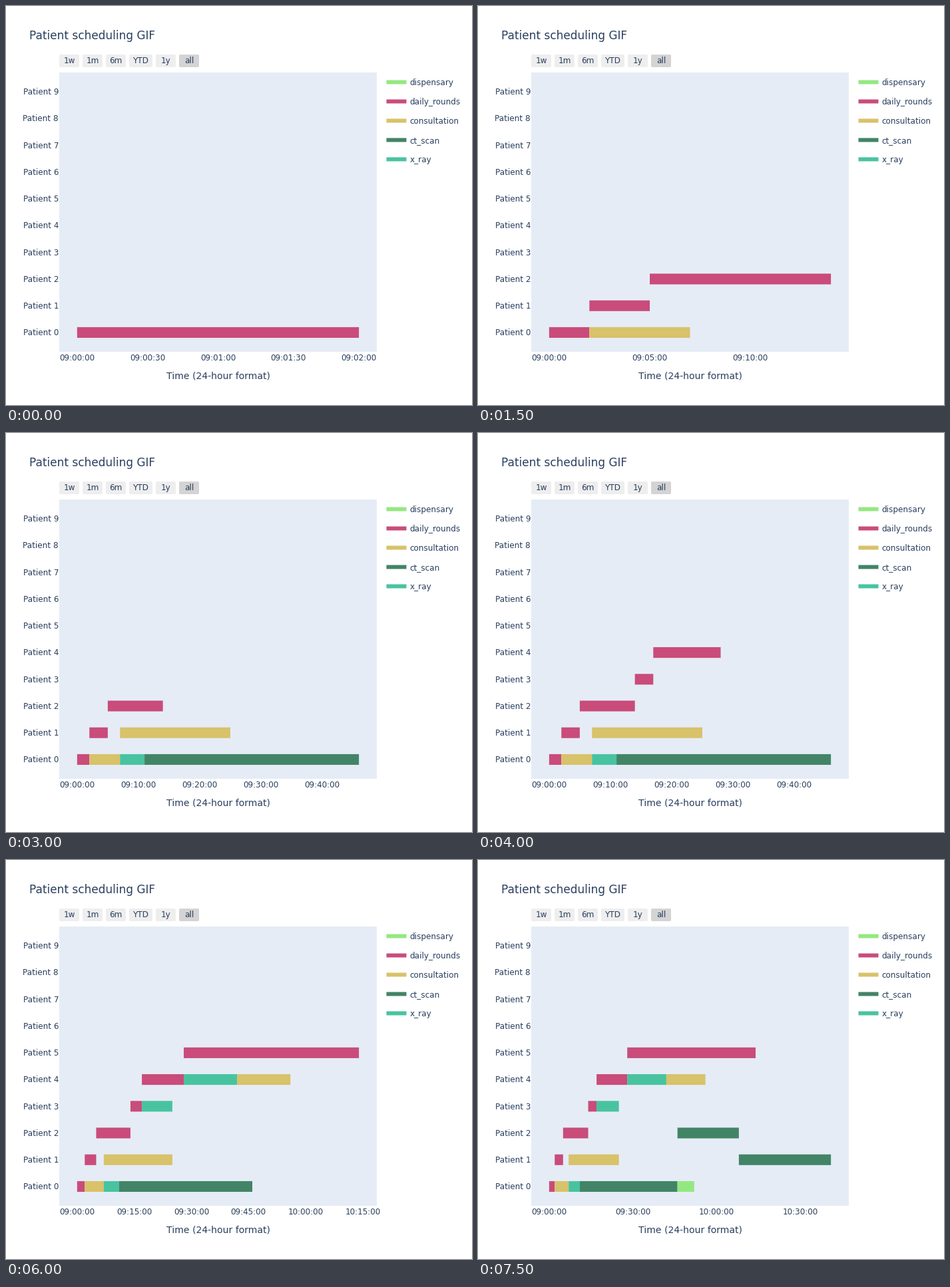
A matplotlib script that plays this animation: 700 by 600 pixels, repeating every 8 s.

```python
import matplotlib.pyplot as plt
from matplotlib.animation import FuncAnimation
from matplotlib.patches import FancyBboxPatch, Rectangle

W, H, DPI = 700, 600, 100
INK = "#2a3f5f"
COLORS = {
    "dispensary": "#94e880",
    "daily_rounds": "#c94c7a",
    "consultation": "#d8c26a",
    "ct_scan": "#428466",
    "x_ray": "#48c3a0",
}

# One booking is added per step: patient, activity, start and end minute.
BOOKINGS = [
    (0, "daily_rounds", 0, 2),
    (1, "daily_rounds", 2, 5),
    (0, "consultation", 2, 7),
    (2, "daily_rounds", 5, 14),
    (1, "consultation", 7, 25),
    (0, "x_ray", 7, 11),
    (0, "ct_scan", 11, 46),
    (3, "daily_rounds", 14, 17),
    (4, "daily_rounds", 17, 28),
    (3, "x_ray", 17, 25),
    (5, "daily_rounds", 28, 74),
    (4, "x_ray", 28, 42),
    (4, "consultation", 42, 56),
    (2, "ct_scan", 46, 68),
    (0, "dispensary", 46, 52),
    (1, "ct_scan", 68, 101),
]
TICK_STEPS = [0.5, 1, 2, 5, 10, 15, 30]

LEFT, TOP, PLOT_W, PLOT_H = 80, 100, 477, 420
X_PAD = 0.05 * PLOT_W + 3
SPAN = PLOT_W - 2 * X_PAD
ROW = PLOT_H * 0.9 / 9.4

plt.rcParams["font.family"] = "DejaVu Sans"
plt.rcParams["toolbar"] = "None"

fig = plt.figure(figsize=(W / DPI, H / DPI), dpi=DPI, facecolor="white")
ax = fig.add_axes([0, 0, 1, 1])
ax.set_xlim(0, W)
ax.set_ylim(H, 0)
ax.axis("off")


def rect(x, y, w, h, color, z=1):
    return ax.add_patch(
        Rectangle((x, y), w, h, facecolor=color, linewidth=0, snap=False, zorder=z))


def label(x, y, text, px=12, align="left"):
    return ax.text(x, y, text, fontsize=px * 72 / DPI, color=INK,
                   ha=align, va="baseline", zorder=3)


def row_y(patient):
    return TOP + PLOT_H / 2 + (4.5 - patient) * ROW


def clock(minute):
    secs = round(minute * 60)
    return f"{9 + secs // 3600:02d}:{secs // 60 % 60:02d}:{secs % 60:02d}"


def draw_static():
    label(35, 50, "Patient scheduling GIF", 17)
    label(LEFT + PLOT_W / 2, 561, "Time (24-hour format)", 14, "center")
    rect(LEFT, TOP, PLOT_W, PLOT_H, "#e5ecf6")
    for p in range(10):
        label(79, row_y(p) + 4.2, f"Patient {p}", align="right")

    x = LEFT
    for name in ("1w", "1m", "6m", "YTD", "1y", "all"):
        w = 35 if name == "YTD" else 30
        color = "#d4d4d4" if name == "all" else "#eeeeee"
        ax.add_patch(FancyBboxPatch(
            (x, 73), w, 19, boxstyle="round,pad=0,rounding_size=2",
            facecolor=color, linewidth=0))
        label(x + w / 2, 86, name, align="center")
        x += w + 5

    for i, (name, color) in enumerate(COLORS.items()):
        y = 114.5 + 29 * i
        rect(571.5, y - 3, 30, 6, color)
        label(606.5, y + 4.5, name)


moving = []


def update(step):
    while moving:
        moving.pop().remove()

    shown = BOOKINGS[:step + 1]
    last = max(end for *_, end in shown)
    scale = SPAN / last
    x0 = LEFT + X_PAD

    for patient, kind, start, end in shown:
        moving.append(rect(x0 + start * scale, row_y(patient) - 0.2 * ROW,
                           (end - start) * scale, 0.4 * ROW, COLORS[kind], 2))

    # Smallest round tick step that keeps labels at least 80 px apart.
    gap = next(s for s in TICK_STEPS if s * scale >= 80)
    minute = 0
    while x0 + minute * scale <= LEFT + PLOT_W:
        moving.append(label(x0 + minute * scale, 533, clock(minute), align="center"))
        minute += gap
    return moving


draw_static()
anim = FuncAnimation(fig, update, frames=len(BOOKINGS), init_func=lambda: update(0),
                     interval=500, repeat=True, repeat_delay=0, blit=False)
plt.show()
```
